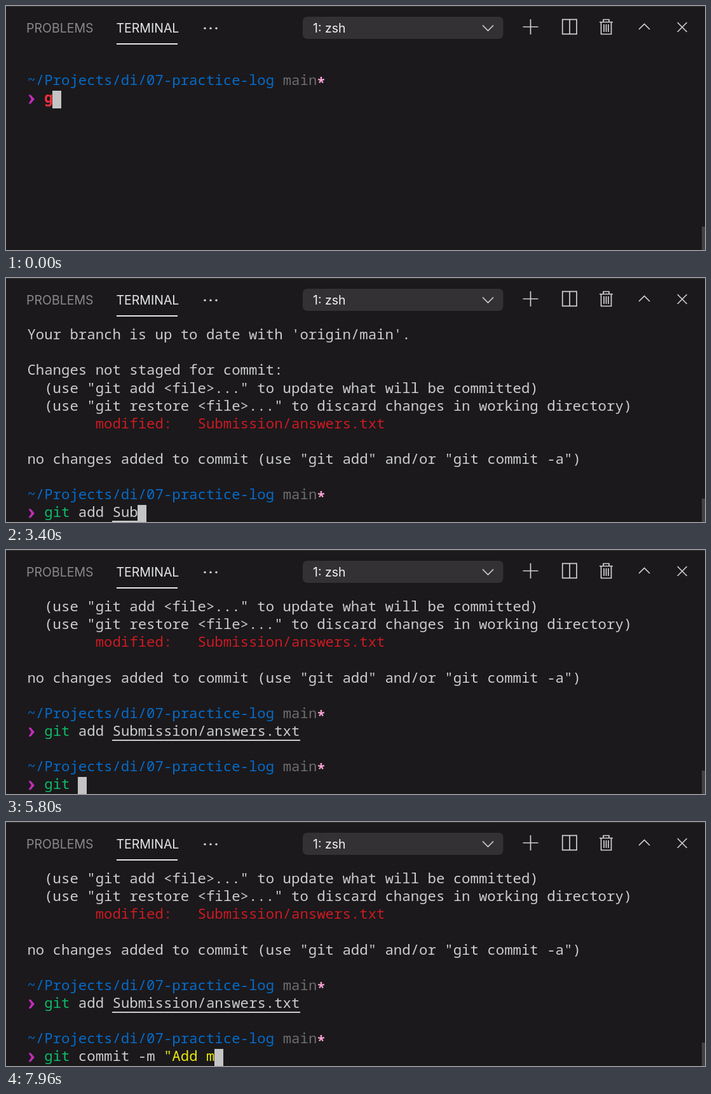
Write an HTML page with a canvas that moves like this. It is 1100 by 386 pixels and loops after 8000 ms.

```html
<!DOCTYPE html>
<html lang="en">
<head>
<meta charset="utf-8">
<title>Terminal</title>
<style>
  html, body { margin: 0; width: 100%; height: 100%; overflow: hidden; background: #1b191c; }
  canvas { display: block; }
</style>
</head>
<body>
<canvas id="stage" width="1100" height="386"></canvas>
<script>
const ctx = document.getElementById('stage').getContext('2d');
const LOOP = 8000, LEFT = 33.4, CELL = 13.41, ROW = 28.1, BASE = 97.2, ROWS = 11;
const MONO = '22.35px "Noto Sans Mono", monospace';
const SANS = 'Inter, sans-serif';
const C = {
  bg: '#1b191c', text: '#cccccc', icon: '#d0d0d0', dim: '#8a888b', blue: '#066bc8', branch: '#6c6c6c',
  star: '#ffa6d8', prompt: '#c52bbd', red: '#cb1a22', error: '#f5303c', green: '#0cbc6a', yellow: '#e8e80a'
};

// Each key press adds one chunk; completed words arrive as one chunk.
const commands = [
  { run: 1320, keys: [...'git status'],
    at: [0, 120, 220, 340, 460, 580, 680, 780, 900, 1040] },
  { run: 5000, keys: [...'git add Sub', 'mission/', 'a', 'nswers.txt '],
    at: [2240, 2340, 2440, 2560, 2700, 2820, 2900, 3000, 3120, 3240, 3360, 3720, 4120, 4400] },
  { run: Infinity, keys: [...'git commit -m "Add m'],
    at: [5280, 5420, 5560, 5720, 5880, 6000, 6120, 6240, 6360, 6460, 6580, 6720, 6840, 6960, 7100,
      7300, 7440, 7560, 7680, 7880] }
];

const plain = (text, color = C.text) => [{ text, color }];
const status = [
  plain('On branch main'),
  plain("Your branch is up to date with 'origin/main'."),
  [],
  plain('Changes not staged for commit:'),
  plain('  (use "git add <file>..." to update what will be committed)'),
  plain('  (use "git restore <file>..." to discard changes in working directory)'),
  plain('        modified:   Submission/answers.txt', C.red),
  [],
  plain('no changes added to commit (use "git add" and/or "git commit -a")')
];
const path = [
  { text: '~/Projects/di/07-practice-log', color: C.blue },
  { text: ' main', color: C.branch },
  { text: '*', color: C.star, weight: 700, drop: 5 }
];

function highlight(command) {
  const tokens = command.match(/".*|\S+|\s+/g) || [];
  return tokens.map((text, i) => {
    if (i === 0) return text === 'git' ? { text, color: C.green } : { text, color: C.error, weight: 700 };
    if (text[0] === '"') return { text, color: C.yellow };
    return { text, color: C.text, underline: text[0] === 'S' };
  });
}

function screenLines(time) {
  const lines = [];
  for (const [i, { run, keys, at }] of commands.entries()) {
    const typed = keys.filter((_, k) => at[k] <= time).join('');
    const line = [{ prompt: true, text: '  ' }, ...highlight(typed)];
    lines.push([], path, line);
    if (time < run) {
      line.push({ cursor: true, text: ' ' });
      break;
    }
    if (i === 0) lines.push(...status);
  }
  return lines;
}

function stroke(d) {
  ctx.strokeStyle = C.icon;
  ctx.lineWidth = 1.7;
  ctx.stroke(new Path2D(d));
}

function box(x, y, w, h, color) {
  ctx.fillStyle = color;
  ctx.fillRect(Math.floor(x), Math.floor(y), Math.ceil(w), Math.ceil(h));
}

function label(text, x, y, color) {
  ctx.font = `19.5px ${SANS}`;
  ctx.fillStyle = color;
  ctx.fillText(text, x, y);
}

function drawHeader() {
  box(0, 0, 1100, 1, '#3b393c');
  label('PROBLEMS', 32, 42, C.dim);
  label('TERMINAL', 173.5, 42, '#e7e7e7');
  box(174, 59, 96, 2, '#e7e7e7');
  ctx.fillStyle = C.icon;
  for (const x of [313, 322, 331]) {
    ctx.beginPath();
    ctx.arc(x, 35.3, 1.7, 0, 7);
    ctx.fill();
  }
  ctx.fillStyle = '#333134';
  ctx.beginPath();
  ctx.roundRect(467, 17, 315.5, 35, 7);
  ctx.fill();
  label('1: zsh', 483, 42, '#f0f0f0');
  stroke('M750 30.5L758.5 39L767 30.5');
  stroke('M825.5 21V45M813.5 33H837.5');
  stroke('M875.7 21.3H898V44.3H875.7ZM887 21.3V44.3');
  stroke('M934 25.5H955M940 25V21.5H949V25M936.5 26V44.5H952.5V26M941 29V41M944.5 29V41M948 29V41');
  stroke('M996 37L1004.5 28.5L1013 37');
  stroke('M1056.7 26L1071.5 41M1071.5 26L1056.7 41');
}

function drawLine(line, y) {
  let x = LEFT;
  for (const { text, color, weight = 500, drop = 0, underline, prompt, cursor } of line) {
    const width = text.length * CELL;
    if (prompt) {
      ctx.fillStyle = C.prompt;
      ctx.fill(new Path2D(`M${x + 2} ${y - 13}h3.5l6 7l-6 7h-3.5l4.5 -7z`));
    } else if (cursor) {
      box(x, y - 19, CELL, 28, '#c4c4c4');
    } else {
      ctx.font = `${weight} ${MONO}`;
      ctx.fillStyle = color;
      ctx.fillText(text, x, y + drop);
      if (underline) box(x, y + 6.3, width, 2, color);
    }
    x += width;
  }
}

function draw(now) {
  box(0, 0, 1100, 386, C.bg);
  drawHeader();
  screenLines(now % LOOP).slice(-ROWS).forEach((line, row) => drawLine(line, BASE + row * ROW));
  box(1095, 349, 5, 37, '#434144');
}

let start;
function tick(now) {
  start ??= now;
  draw(now - start);
  requestAnimationFrame(tick);
}
requestAnimationFrame(tick);
</script>
</body>
</html>
```
